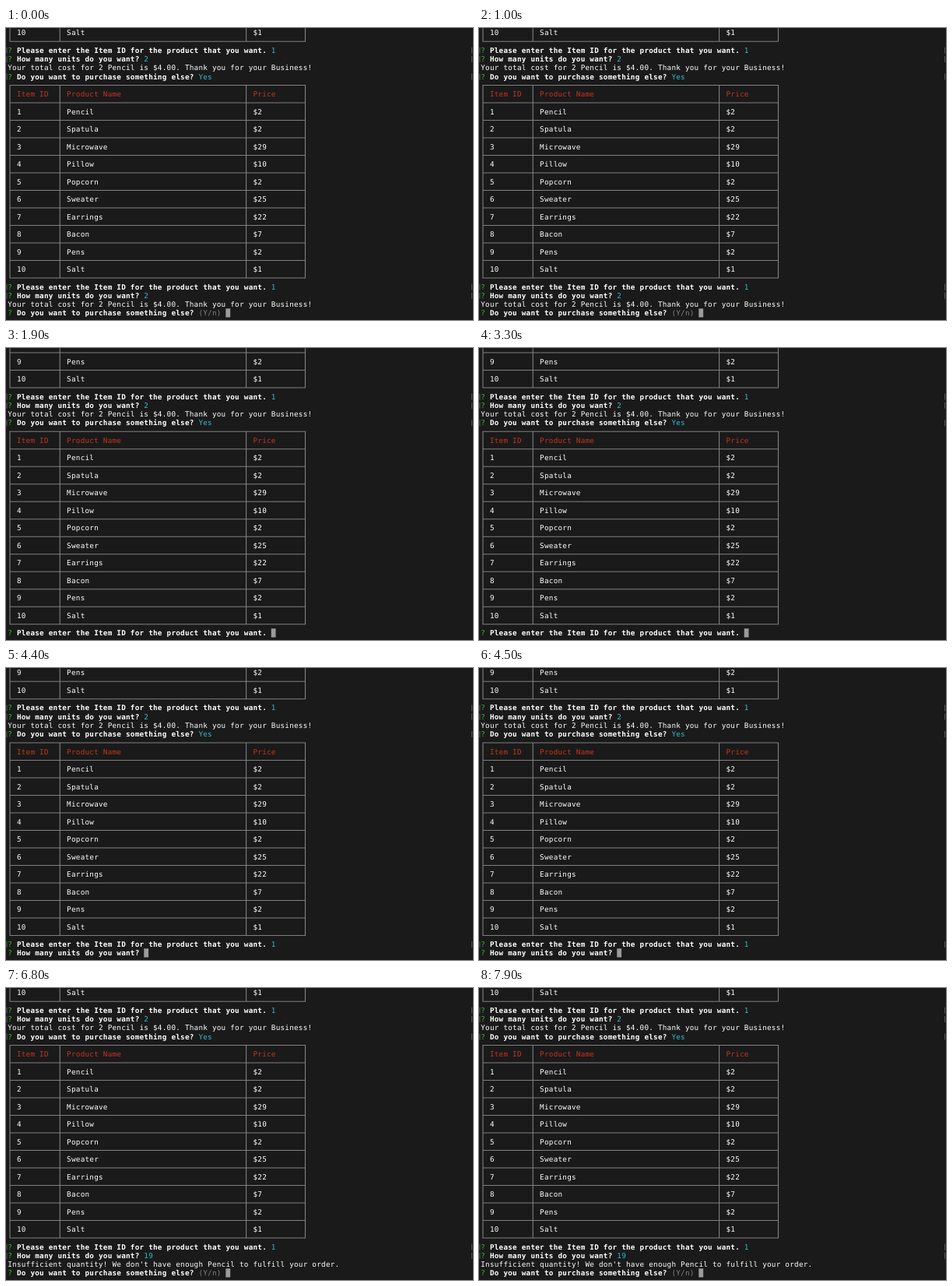
Animation, 600 px wide and 375 px high, one loop 8 s. Source, as an HTML page with a canvas:

```html
<!DOCTYPE html>
<html lang="en">
<head>
<meta charset="utf-8">
<title>Store terminal</title>
<style>
  html, body { margin: 0; width: 100%; height: 100%; overflow: hidden; background: #1a1a1a; }
  canvas { display: block; }
</style>
</head>
<body>
<canvas id="screen" width="600" height="375"></canvas>
<script>
const ctx = document.getElementById('screen').getContext('2d');
ctx.textRendering = 'geometricPrecision';

const LOOP = 8000;
const ROWS = 33;
const CELL = 5.838;
const LINE = 11.25;
const LEFT = 2.1;
const TOP = 0.3;
const BASELINE = 9;
const RULE = 1.1;
const FONT = '9.3px "DejaVu Sans Mono", monospace';

const COLOR = {
  back: '#1a1a1a', text: '#ffffff', green: '#35bd2d', cyan: '#34bbc8',
  red: '#c5361f', grey: '#818383', rule: '#808080', cursor: '#9b9b9b', mark: '#666666'
};

const BORDERS = [0, 11, 52, 65];
const CELLS = [2, 13, 54];
const PRODUCTS = [
  ['Pencil', 2], ['Spatula', 2], ['Microwave', 29], ['Pillow', 10], ['Popcorn', 2],
  ['Sweater', 25], ['Earrings', 22], ['Bacon', 7], ['Pens', 2], ['Salt', 1]
];
const ASK_ITEM = 'Please enter the Item ID for the product that you want.';
const ASK_UNITS = 'How many units do you want?';
const ASK_MORE = 'Do you want to purchase something else?';

const span = (text, color = COLOR.text, bold = false) => ({ text, color, bold });
const border = (up, down) => ({ border: true, up, down });
const cells = (values, color) => ({ cells: values, color });

const prompt = (question, ...rest) =>
  ({ spans: [span('? ', COLOR.green), span(question + ' ', COLOR.text, true), ...rest] });
const answered = (question, answer) =>
  ({ ...prompt(question, span(answer, COLOR.cyan)), marked: true });
const typing = (question, typed = '') => ({ ...prompt(question, span(typed)), cursor: true });
const confirming = (typed = '') =>
  ({ ...prompt(ASK_MORE, span('(Y/n) ', COLOR.grey), span(typed)), cursor: true });
const says = text => ({ spans: [span(text)] });

const table = [
  border(0, 1),
  cells(['Item ID', 'Product Name', 'Price'], COLOR.red),
  ...PRODUCTS.flatMap(([name, price], i) =>
    [border(1, 1), cells([String(i + 1), name, '$' + price], COLOR.text)]),
  border(1, 0)
];
const bought = [
  answered(ASK_ITEM, '1'),
  answered(ASK_UNITS, '2'),
  says('Your total cost for 2 Pencil is $4.00. Thank you for your Business!')
];
const yes = answered(ASK_MORE, 'Yes');

const firstOrder = [...table, ...bought, yes, ...table, ...bought];
const nextOrder = [...firstOrder, yes, ...table];
const chosen = [...nextOrder, answered(ASK_ITEM, '1')];
const refused = [
  ...chosen,
  answered(ASK_UNITS, '19'),
  says("Insufficient quantity! We don't have enough Pencil to fulfill your order.")
];

const states = [
  [0, firstOrder, confirming()],
  [1300, firstOrder, confirming('y')],
  [1800, firstOrder, { ...yes, cursor: true }],
  [1900, nextOrder, typing(ASK_ITEM)],
  [4100, nextOrder, typing(ASK_ITEM, '1')],
  [4400, chosen, typing(ASK_UNITS)],
  [5700, chosen, typing(ASK_UNITS, '1')],
  [6200, chosen, typing(ASK_UNITS, '19')],
  [6700, refused, confirming()]
];

const columnX = col => LEFT + col * CELL;
const borderX = col => columnX(col + 0.5) - RULE / 2;

function rect(x, y, w, h, color) {
  ctx.fillStyle = color;
  ctx.fillRect(x, y, w, h);
}

// One glyph per terminal cell.
function write(text, col, y, color, bold) {
  ctx.font = (bold ? 'bold ' : '') + FONT;
  ctx.fillStyle = color;
  ctx.textAlign = 'center';
  [...text].forEach((glyph, i) => ctx.fillText(glyph, columnX(col + i + 0.5), y + BASELINE));
}

function addVerticals(from, to) {
  for (const col of BORDERS) ctx.rect(borderX(col), from, RULE, to - from);
}

function addBorder(line, y) {
  const middle = y + (LINE - RULE) / 2;
  const start = borderX(BORDERS[0]);
  const end = borderX(BORDERS[BORDERS.length - 1]) + RULE;
  ctx.rect(start, middle, end - start, RULE);
  addVerticals(line.up ? y : middle, line.down ? y + LINE : middle + RULE);
}

function drawSpans(line, y) {
  let col = 0;
  for (const { text, color, bold } of line.spans) {
    write(text, col, y, color, bold);
    col += text.length;
  }
  if (line.marked) {
    rect(0.6, y + 2, 0.8, 8, COLOR.mark);
    rect(598, y + 2, 0.8, 8, COLOR.mark);
  }
  if (line.cursor) rect(columnX(col), y, CELL, LINE, COLOR.cursor);
}

function drawLine(line, row) {
  const y = TOP + row * LINE;
  if (line.border) {
    addBorder(line, y);
  } else if (line.cells) {
    addVerticals(y, y + LINE);
    line.cells.forEach((text, i) => write(text, CELLS[i], y, line.color));
  } else {
    drawSpans(line, y);
  }
}

function frame() {
  const time = performance.now() % LOOP;
  const [, log, active] = states.findLast(([start]) => start <= time);
  rect(0, 0, 600, 375, COLOR.back);
  ctx.beginPath();
  [...log, active].slice(-ROWS).forEach(drawLine);
  ctx.fillStyle = COLOR.rule;
  ctx.fill();
  requestAnimationFrame(frame);
}

frame();
</script>
</body>
</html>
```
